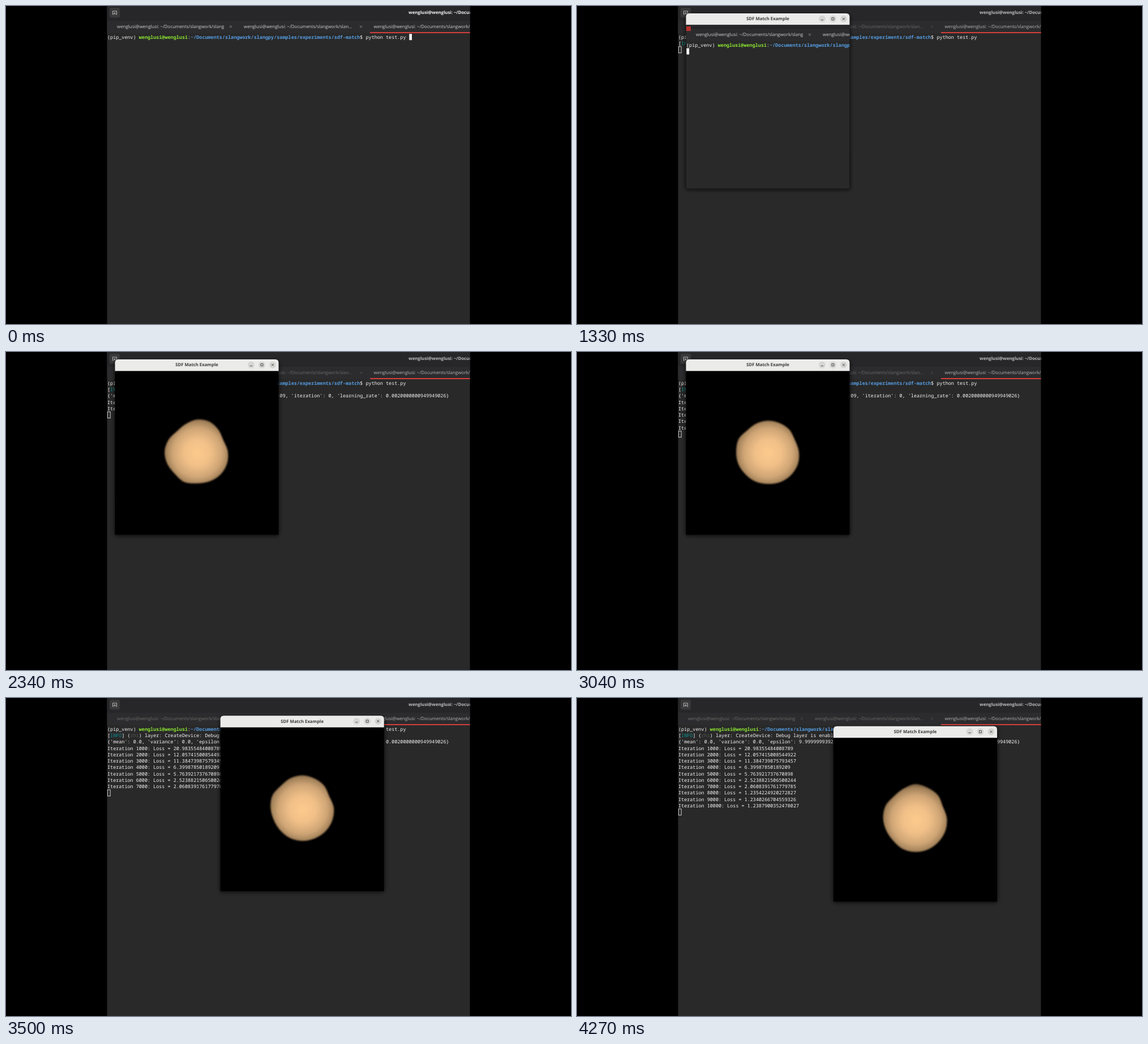
Animation of 998x561 px, one loop 4.47 s. Source, as an HTML page:

```html
<!DOCTYPE html>
<html lang="en">
<head>
<meta charset="utf-8">
<title>SDF Match Example</title>
<style>
  html, body { margin: 0; width: 100%; height: 100%; overflow: hidden; background: #000; }
  svg { display: block; width: 998px; height: 561px; }
  text { white-space: pre; text-rendering: geometricPrecision; }
  .mono { font: 8.46px "Noto Sans Mono", "DejaVu Sans Mono", monospace; fill: #f4f4f4; }
  .ui { font: 7.95px "Open Sans", "Noto Sans", sans-serif; fill: #cfcfcf; }
  .title { font: 700 7.75px "Open Sans", "Noto Sans", sans-serif; fill: #f6f6f6; }
  .user { fill: #8ae234; font-weight: 700; }
  .path { fill: #559bdf; font-weight: 700; }
  .info { fill: #0a9296; }
  .faint { fill: #55564f; }
  .close { stroke: #999; stroke-width: .8; }
  .unfocused .title { fill: #bdbdbd; }
  .unfocused .ui { fill: #b4b4b4; }
  .unfocused .idle { fill: #6b6b69; }
  .unfocused .close { stroke: #50504c; }
</style>
</head>
<body>
<svg viewBox="0 0 998 561" xmlns="http://www.w3.org/2000/svg">
  <defs>
    <clipPath id="screen"><rect x="178.5" width="641" height="561"/></clipPath>
    <clipPath id="canvas"><rect x="192.5" y="33.5" width="289" height="289"/></clipPath>
    <radialGradient id="skin" gradientUnits="userSpaceOnUse" cx="338" cy="178" r="66">
      <stop offset="0" stop-color="#fdca8d"/>
      <stop offset=".35" stop-color="#f1c088"/>
      <stop offset=".65" stop-color="#d0a676"/>
      <stop offset=".85" stop-color="#a18059"/>
      <stop offset="1" stop-color="#5c4832"/>
    </radialGradient>
    <filter id="soft"><feGaussianBlur stdDeviation=".9"/></filter>
    <filter id="shade" x="-10%" y="-10%" width="120%" height="120%"><feGaussianBlur stdDeviation="3"/></filter>
  </defs>
  <rect width="998" height="561"/>
  <g clip-path="url(#screen)">
    <g id="terminal"></g>
    <g id="output" class="mono"></g>
    <rect id="cursor" width="4.8" height="11"/>
    <g id="window">
      <rect x="191" y="15" width="292" height="310" rx="6" opacity=".6" filter="url(#shade)"/>
      <path d="M192.5 34V19q0-6 6-6H475.5q6 0 6 6V34z" fill="#ebebea"/>
      <text class="title" style="fill:#3b3b3b" x="337" y="25.3" text-anchor="middle">SDF Match Example</text>
      <g fill="#d6d6d5">
        <circle cx="433" cy="22.7" r="6"/><circle cx="452" cy="22.7" r="6"/><circle cx="471" cy="22.7" r="6"/>
      </g>
      <path d="M431 24.5h4M450 20.7h4v4h-4zM469 20.7l4 4m0-4l-4 4" fill="none" stroke="#3b3b3b" stroke-width=".9"/>
      <rect x="192.5" y="33.5" width="289" height="289"/>
      <g clip-path="url(#canvas)">
        <g id="ghost"></g>
        <g id="render" filter="url(#soft)">
          <path id="blob" fill="url(#skin)" stroke="#2b2116" stroke-opacity=".55" stroke-width="2.4"/>
        </g>
      </g>
    </g>
  </g>
</svg>
<script>
const LOOP = 4470;
const ENTER = 200, OPEN = 620, DEVICE = 1130, TRAIN = 1670, REPORT = 235;
const LEFT = 179, FIRST_BASELINE = 57.7, LINE = 11.27;

const account = 'wenglusi@wenglusi';
const place = account + ': ~/Documents/slangwork/';
const losses = ['20.98355484008789', '12.057415008544922', '11.384739875793457', '6.39987850189209',
  '5.763921737670898', '2.5238821506500244', '2.0608391761779785', '1.2354224920272827',
  '1.2340266704559326', '1.2387900352478027'];

// Outline radii every 22.5 degrees, clockwise from the right.
const outlines = [
  [1700, [54, 58, 62, 58, 57, 60, 57, 56, 55, 52, 52, 53, 62, 63, 59, 53]],
  [2340, [55, 58, 59, 58, 57, 59, 56, 57, 57, 54, 50, 52, 56, 57, 54, 51]],
  [3040, [55, 58, 59, 59, 58, 58, 57, 57, 56, 56, 52, 53, 54, 54, 54, 52]],
  [3500, [56, 58, 59, 59, 59, 58, 56, 55, 56, 57, 54, 56, 57, 56, 55, 52]],
  [4270, [56, 58, 59, 60, 60, 59, 56, 56, 57, 57, 54, 56, 60, 58, 57, 53]]
];

const get = id => document.getElementById(id);
const clamp = v => Math.max(0, Math.min(1, v));
const mix = (a, b, u) => a + (b - a) * u;
const span = (name, text) => `<tspan class="${name}">${text}</tspan>`;
const row = (n, text) => `<text x="${LEFT}" y="${FIRST_BASELINE + n * LINE}">${text}</text>`;
const tab = (x, text, name = '') => `<text class="ui ${name}" x="${x}" y="39">${text}</text>`;
const cross = x => `<path class="close" d="M${x - 2} 34.5l4 4m0-4l-4 4"/>`;

function terminal() {
  return `
    <rect x="178" width="642" height="561" fill="#292929"/>
    <rect x="178" width="642" height="25" fill="#27272a"/>
    <rect x="178" y="25" width="642" height="23" fill="#2c2c2e"/>
    <path d="M178 25h642" stroke="#222224"/>
    <rect x="183" y="3" width="18" height="17.5" rx="3" fill="#39393a"/>
    <path d="M190 15h-1.5v-6h7v6H194M192 11v4m-2-2h4" fill="none" stroke="#c4c4c4" stroke-width=".9"/>
    <text class="title" x="711" y="14.4">${place}</text>
    ${tab(196, place + 'slang', 'idle')}${cross(397)}
    ${tab(420, place + 'slan…', 'idle')}${cross(627)}
    ${tab(649.5, place + 'slangpy')}
    <rect x="643" y="46" width="177" height="2" fill="#d23f3c"/>
    <g class="mono">${row(0, '(pip_venv) ' + span('user', account) + ':' +
      span('path', '~/Documents/slangwork/slangpy/samples/experiments/sdf-match') + '$ python test.py')}</g>`;
}

const output = [
  [DEVICE, '[' + span('info', 'INFO') + '] (' + span('faint', 'rhi') + ') layer: CreateDevice: Debug layer is enabled.'],
  [TRAIN, "{'mean': 0.0, 'variance': 0.0, 'epsilon': 9.99999993922529e-09, 'iteration': 0, 'learning_rate': 0.0020000000949949026}"],
  ...losses.map((loss, i) => [TRAIN + (i + 1) * REPORT, `Iteration ${i + 1}000: Loss = ${loss}`])
];

get('terminal').innerHTML = terminal();
get('output').innerHTML = output.map(([, text], i) => row(i + 1, text)).join('');
get('ghost').innerHTML = `<g transform="translate(14 14)">${terminal()}
  <rect x="179.4" y="60.5" width="4.8" height="11" fill="#f4f4f4"/></g>
  <rect x="193" y="36" width="8" height="8" fill="#b8322c"/>`;
const rows = [...get('output').children];

function radii(t) {
  let i = 0;
  while (i < outlines.length - 2 && t > outlines[i + 1][0]) i++;
  const [t0, a] = outlines[i], [t1, b] = outlines[i + 1];
  const u = clamp((t - t0) / (t1 - t0));
  return a.map((r, k) => mix(r, b[k], u));
}

// Closed Catmull-Rom curve through the outline points.
function outline(t) {
  const pts = radii(t).map((r, k) => {
    const angle = k * Math.PI / 8;
    return [337 + r * Math.cos(angle), 175 + r * Math.sin(angle)];
  });
  const at = i => pts[(i + pts.length) % pts.length];
  const handle = (i, sign) => at(i).map((v, k) => v + sign * (at(i + 1)[k] - at(i - 1)[k]) / 6);
  return 'M' + at(0) + pts.map((_, i) => `C${handle(i, 1)} ${handle(i + 1, -1)} ${at(i + 1)}`).join('') + 'z';
}

function dragged(t) {
  const pull = clamp((t - 3080) / 420);
  const settle = 1 - (1 - clamp((t - 3500) / 400)) ** 2;
  return [185.8 * pull + 74.7 * settle, 18.2 * pull + 18.6 * settle];
}

const show = (node, on) => node.setAttribute('visibility', on ? 'inherit' : 'hidden');

function draw(t) {
  const opened = t >= OPEN, training = t >= TRAIN;
  get('terminal').setAttribute('class', opened ? 'unfocused' : '');
  rows.forEach((node, i) => show(node, t >= output[i][0]));

  const line = t < ENTER ? 0 : 1 + output.filter(([start]) => t >= start).length;
  const cursor = get('cursor');
  cursor.setAttribute('x', line ? LEFT + .4 : 712.2);
  cursor.setAttribute('y', 49.2 + line * LINE);
  cursor.setAttribute('fill', opened ? 'none' : '#f4f4f4');
  cursor.setAttribute('stroke', opened ? '#dcdcdc' : 'none');
  cursor.setAttribute('stroke-width', .9);

  get('window').setAttribute('transform', `translate(${dragged(t)})`);
  show(get('window'), opened);
  show(get('ghost'), !training);
  show(get('render'), training);
  get('blob').setAttribute('d', outline(t));
}

function tick() {
  draw(performance.now() % LOOP);
  requestAnimationFrame(tick);
}
tick();
</script>
</body>
</html>
```
